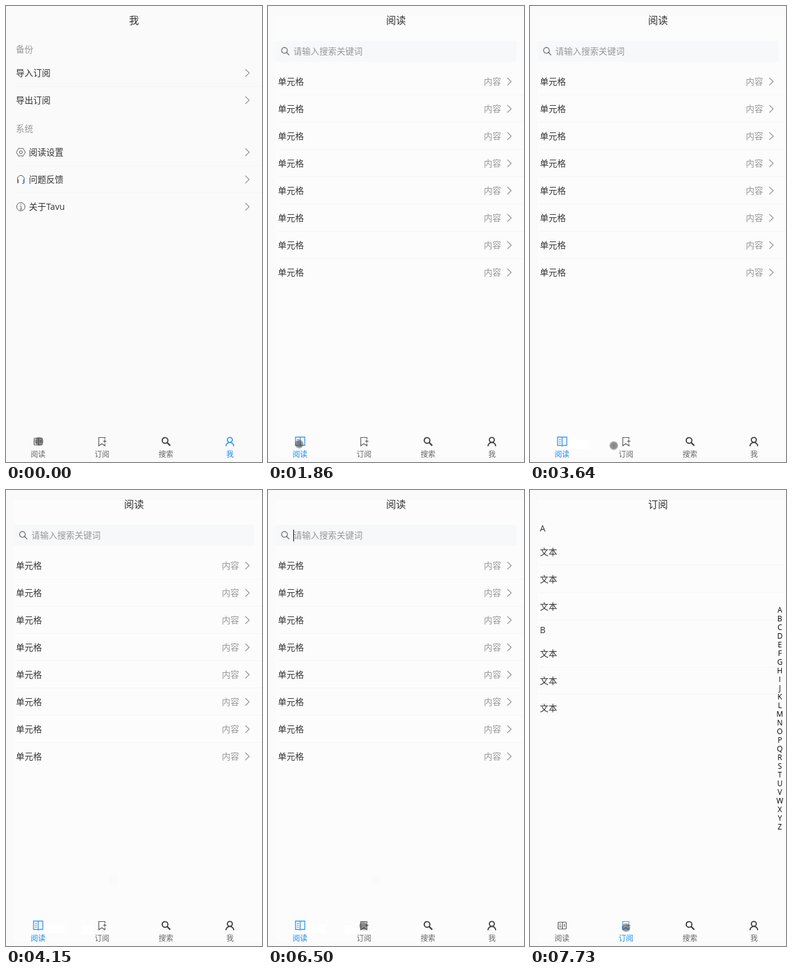
An HTML page that plays this animation: 414x736 px, repeating every 8000 ms.

```html
<!DOCTYPE html>
<html lang="zh-CN">
<head>
<meta charset="utf-8">
<style>
  html, body { margin: 0; width: 100%; height: 100%; overflow: hidden; background: #fafafa; }
  svg { display: block; width: 414px; height: 736px; font-family: "Open Sans", "Noto Sans CJK SC", "Noto Sans CJK", sans-serif; }
  .line { fill: none; stroke: currentColor; }
</style>
</head>
<body>
<svg id="stage" viewBox="0 0 414 736"></svg>
<script>
const LOOP = 8000, DARK = '#323233', GRAY = '#969799', ICON = '#555', BLUE = '#1989fa';
const stage = document.getElementById('stage');

// y is the vertical middle of the text
const text = (x, y, s, size = 14, color = DARK, anchor = 'start') =>
  `<text x="${x}" y="${Math.round(y + size * .37)}" font-size="${size}" fill="${color}" text-anchor="${anchor}">${s}</text>`;
const rect = (x, y, w, h, fill, r = 0) =>
  `<rect x="${x}" y="${y}" width="${w}" height="${h}" rx="${r}" fill="${fill}"/>`;
const path = (d, width = 1, color = 'currentColor') =>
  `<path class="line" color="${color}" stroke-width="${width}" d="${d}"/>`;
const ring = (x, y, r, width = 1, color = 'currentColor') =>
  `<circle class="line" color="${color}" stroke-width="${width}" cx="${x}" cy="${y}" r="${r}"/>`;
const title = s => text(207, 23, s, 16, DARK, 'middle');
const divider = y => rect(16, y, 398, 1, '#f5f5f6');
const chevron = y => path(`M387 ${y - 6}l6.3 6l-6.3 6`, 1.3, GRAY);
const list = (n, f) => Array.from({ length: n }, (_, i) => f(i)).join('');
const panel = rect(12, 16, 402, 712, '#fcfcfc');

const rowIcons = {
  gear: y => path(`M20.5 ${y - 6.3}q3.5 1 7 0l3.8 6.3l-3.8 6.3q-3.5 -1 -7 0l-3.8 -6.3z`, 1, ICON) + ring(24, y, 2.4, 1, ICON),
  headset: y => path(`M18.5 ${y + 1}v-2a5.5 5.5 0 0 1 11 0v2M29.5 ${y + 5}q0 1.7 -3.5 1.7`, 1, ICON) +
    rect(18, y, 2.6, 6, '#8a7a6c', 1) + rect(27.6, y, 2.6, 6, '#5c8fc4', 1),
  info: y => ring(24, y, 6.7, 1, ICON) + path(`M22.5 ${y - 1}h1.8v5M22.3 ${y + 4}h4M24 ${y - 4.5}v1.5`, 1, ICON)
};

function mePage() {
  const row = (y, s, icon) => (icon ? rowIcons[icon](y) : '') + text(icon ? 37 : 16, y, s) + chevron(y);
  return title('我') + text(16, 70, '备份', 14, GRAY) + row(108, '导入订阅') + row(152, '导出订阅') +
    text(16, 198, '系统', 14, GRAY) + row(236, '阅读设置', 'gear') + row(280, '问题反馈', 'headset') +
    row(324, '关于Tavu', 'info') + [129, 257, 301].map(divider).join('');
}

function readPage() {
  const row = i => {
    const y = 122 + 44 * i;
    return text(16, y, '单元格') + text(377, y, '内容', 14, GRAY, 'end') + chevron(y) + (i < 7 ? divider(y + 21) : '');
  };
  return panel + title('阅读') + rect(12, 56, 390, 34, '#f6f8fa', 3) +
    ring(26.6, 71.6, 4.7, 1.1, ICON) + path('M30 75L34.3 79.3', 1.1, ICON) +
    text(41, 73, '请输入搜索关键词', 14, GRAY) + list(8, row);
}

function subscribePage() {
  const group = (y, letter) => text(16, y, letter) + list(3, i => text(16, y + 38 + 44 * i, '文本'));
  return panel + title('订阅') + group(62, 'A') + group(226, 'B') +
    [121, 165, 209, 285, 329].map(divider).join('') +
    list(26, i => text(404, 194 + 14 * i, String.fromCharCode(65 + i), 12, '#000', 'middle'));
}

// Each icon is drawn in the current colour; the book grows when its tab is active
const tabs = [
  ['阅读', 51.75, active => active
    ? path('M44.5 695.8h15v13.4h-5.5l-2 1l-2 -1h-5.5zM52 696v13', 1.4) + path('M46.5 699.5h3.5M46.5 702.5h3.5M46.5 705.5h3.5')
    : path('M46.5 697.5h11q1 0 1 1v9q0 1 -1 1h-11q-1 0 -1 -1v-9q0 -1 1 -1zM52.5 697.5v11.5', 1.2, ICON) +
      path('M47.5 700.5h3M47.5 703.5h3M47.5 705.5h3M55.5 700v5.5', 1, ICON)],
  ['订阅', 155.25, active =>
    path('M160 699v-2.5h-10v13.3l5 -3.3l5 3.3v-3.3M157 702.5h5.5M159.7 699.8v5.4', 1.2, active ? undefined : ICON)],
  ['搜索', 258.75, () => ring(257.2, 701.2, 4.6, 1.9) + path('M260.6 704.6l5 5', 2.2)],
  ['我', 362.25, () => ring(362, 700.3, 4, 1.8) + path('M355.8 710.5a6.2 6.2 0 0 1 12.4 0', 1.8)]
];

const pages = [
  { from: 0, tab: 3, draw: mePage },
  { from: 1860, tab: 0, draw: readPage },
  { from: 7730, tab: 1, draw: subscribePage }
];

// Touch pointer steps: time, centre x, centre y; time alone hides it
const touches = [
  [0, 53.5, 702.5], [250, 52.8, 703.3], [410, 52, 705], [990, 51, 706], [1270, 50.5, 707],
  [2820, 66, 707.5], [2950, 87.5, 707.5], [3090],
  [3210, 131.5, 709.5], [3370, 133.5, 709.5], [3520, 134.5, 709.5], [3640, 135.5, 709.5],
  [3790, 136, 710], [3910, 150, 680], [4030, 174.5, 629.5], [4150],
  [5110, 169.5, 67.5], [5670], [6220, 150.5, 670.5], [6370, 153, 690], [6500, 154.5, 703.5], [6640, 155.3, 706.3]
];

// Faint marks left by the pointer: x, y, w, h, colour, shown from, shown until
const trails = [
  [60, 700, 35, 15, '#fff', 2950, 6640],
  [124, 702, 17, 15, '#fff', 3790, 6640],
  [167, 622, 15, 15, '#fafafa', 4150, 7730]
];
const caretTimes = [[5110, 5670], [6100, 6640], [7070, 7600]];

const tabBar = selected => tabs.map(([label, x, icon], i) => {
  const active = i === selected;
  return `<g color="${active ? '#3698fb' : '#3c3c3c'}">${icon(active)}</g>` +
    text(x, 723.5, label, 12, active ? BLUE : '#646566', 'middle');
}).join('');

stage.innerHTML = `<defs><radialGradient id="touch">
    <stop offset="0" stop-color="#333" stop-opacity=".6"/>
    <stop offset=".7" stop-color="#333" stop-opacity=".52"/>
    <stop offset="1" stop-color="#333" stop-opacity=".1"/></radialGradient></defs>` +
  pages.map(p => `<g class="page">${p.draw()}</g>`).join('') +
  trails.map(([x, y, w, h, c]) => `<g class="trail">${rect(x, y, w, h, c)}</g>`).join('') +
  pages.map(p => `<g class="bar">${tabBar(p.tab)}</g>`).join('') +
  `<g id="caret">${rect(41, 64, 1, 19, '#000')}</g><circle id="dot" r="7.5" fill="url(#touch)"/>`;

const all = s => [...stage.querySelectorAll(s)];
const pageNodes = all('.page'), barNodes = all('.bar'), trailNodes = all('.trail');
const caret = document.getElementById('caret'), dot = document.getElementById('dot');
const show = (node, on) => node.style.display = on ? '' : 'none';

function render(t) {
  const current = pages.findLastIndex(p => t >= p.from);
  pages.forEach((_, i) => {
    show(pageNodes[i], i === current);
    show(barNodes[i], i === current);
  });
  trails.forEach(([, , , , , from, until], i) => show(trailNodes[i], t >= from && t < until));
  show(caret, caretTimes.some(([from, until]) => t >= from && t < until));
  const [, x, y] = touches.findLast(step => t >= step[0]);
  show(dot, x !== undefined);
  if (x !== undefined) {
    dot.setAttribute('cx', x);
    dot.setAttribute('cy', y);
  }
}

const start = performance.now();
function tick() {
  render((performance.now() - start) % LOOP);
  requestAnimationFrame(tick);
}
tick();
</script>
</body>
</html>
```
